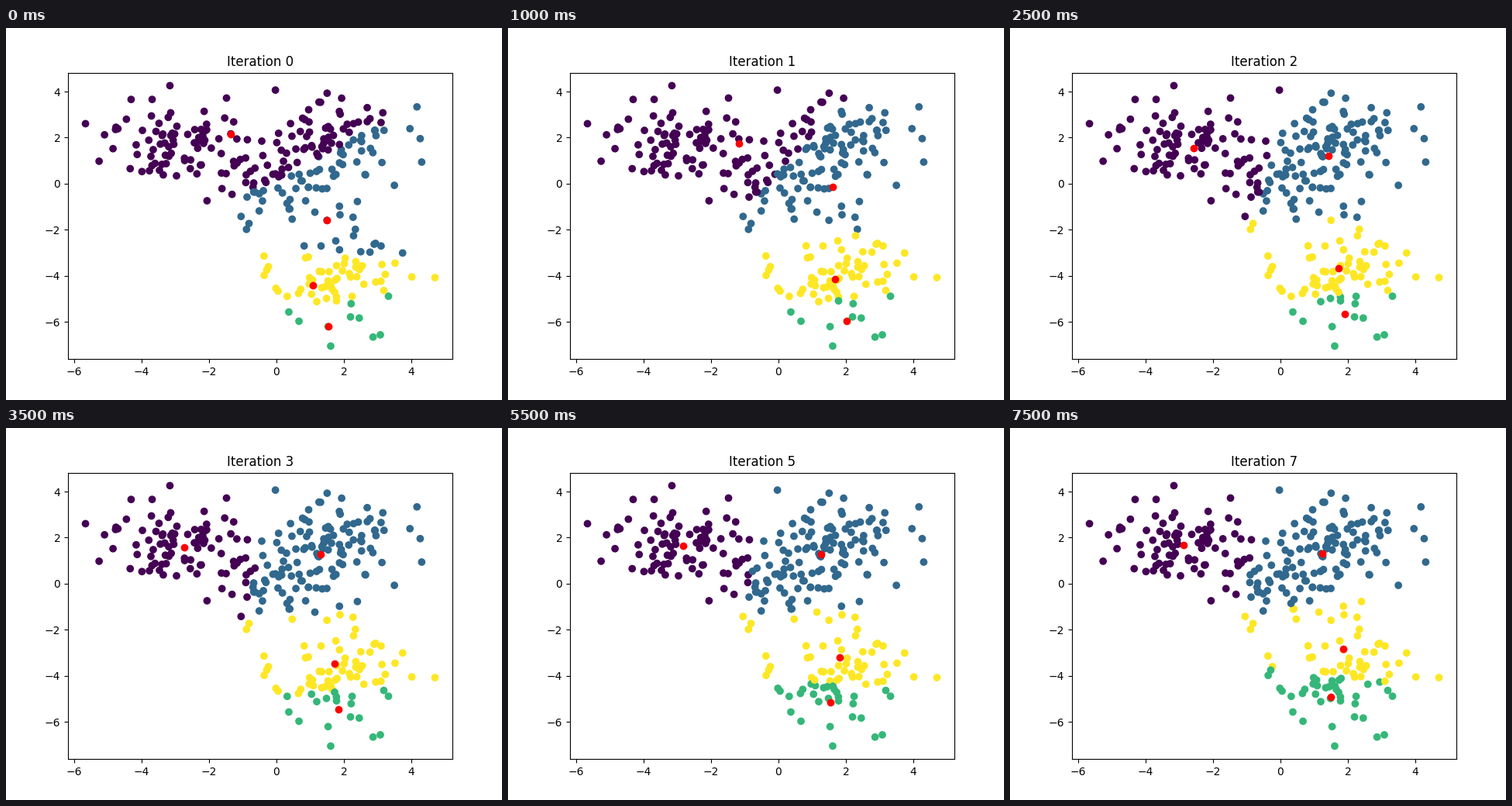
Recreate the animation shown at these times as a matplotlib script. Size 640 by 480 pixels, loop 8000 ms.

```python
import matplotlib.pyplot as plt
import numpy as np
from matplotlib.animation import FuncAnimation

ITERATIONS = 8
BLOBS = [(0, 0), (2, 2), (-3, 2), (2, -4)]
SEEDS = np.array([(-1.35, 2.14), (1.5, -1.6), (1.53, -6.2), (1.09, -4.43)])


def make_points(per_blob=75):
    rng = np.random.RandomState(0)
    pts = np.vstack([rng.normal(c, 1.0, (per_blob, 2)) for c in BLOBS])
    order = np.arange(len(pts))
    rng.shuffle(order)
    return pts[order]


def sq_dist(a, b):
    return ((a[:, None] - b[None]) ** 2).sum(axis=2)


def k_means(pts, centers, steps):
    """Return the centers (steps + 1) and the labels (steps) of every step."""
    all_centers, all_labels = [centers], []
    for _ in range(steps):
        labels = sq_dist(pts, centers).argmin(axis=1)
        centers = np.array([pts[labels == k].mean(axis=0)
                            for k in range(len(centers))])
        all_labels.append(labels)
        all_centers.append(centers)
    return all_centers, all_labels


points = make_points()
start = points[sq_dist(SEEDS, points).argmin(axis=1)]
centers, labels = k_means(points, start, ITERATIONS)

fig, ax = plt.subplots(figsize=(6.4, 4.8), dpi=100)
dots = ax.scatter(points[:, 0], points[:, 1], c=labels[0],
                  cmap="viridis", vmin=0, vmax=3)
marks = ax.scatter(start[:, 0], start[:, 1], c="red")
title = ax.set_title("Iteration 0")
# Keep the view fixed while the centers move
ax.set_xlim(ax.get_xlim())
ax.set_ylim(ax.get_ylim())


def update(i):
    # Even frames assign the labels, odd frames move the centers
    step = i // 2
    dots.set_array(labels[step])
    marks.set_offsets(centers[(i + 1) // 2])
    title.set_text(f"Iteration {step}")
    return dots, marks, title


anim = FuncAnimation(fig, update, frames=2 * ITERATIONS, interval=500,
                     repeat=True, repeat_delay=0, blit=False)
plt.show()
```
